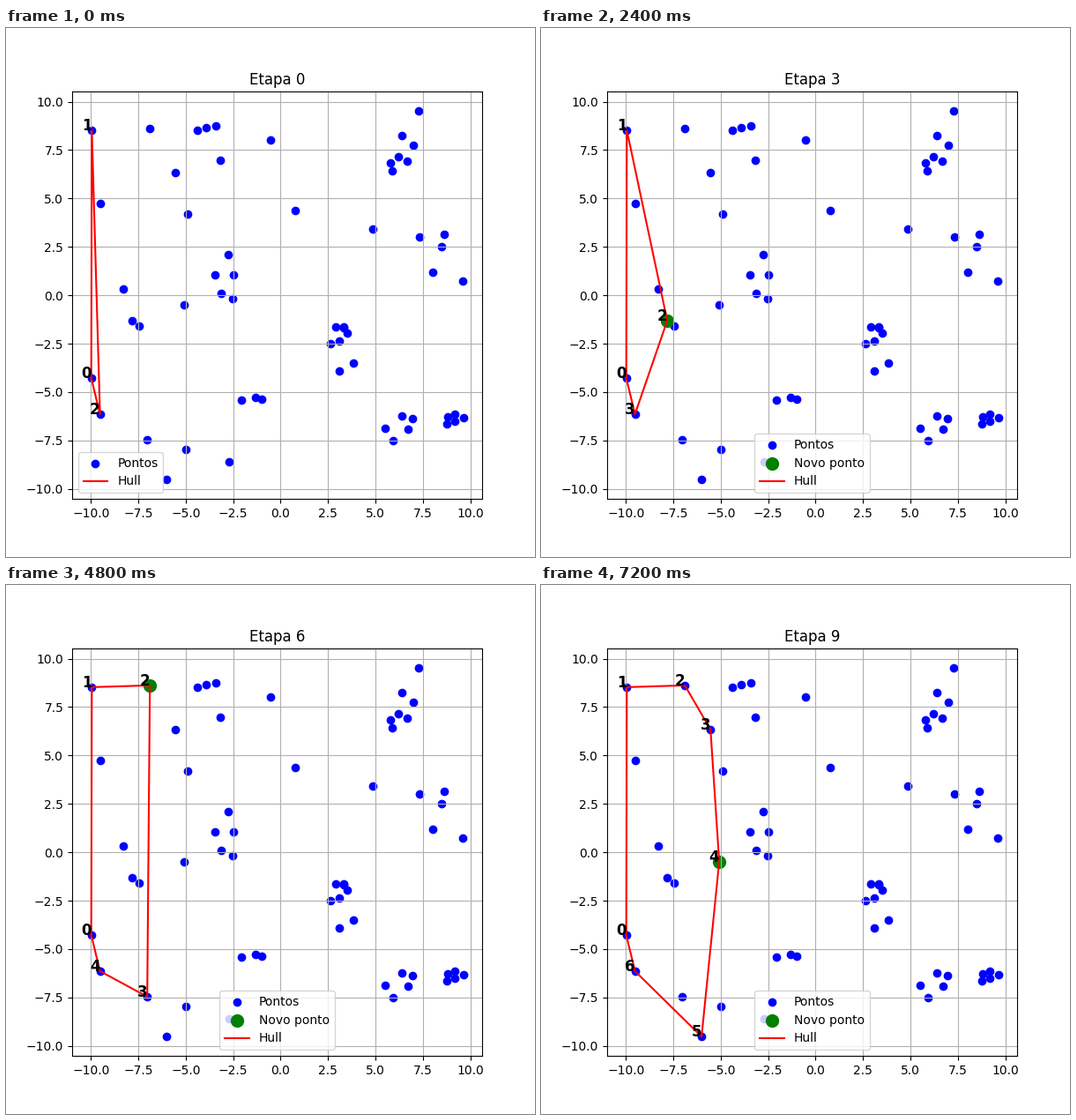
Recreate the animation shown at these times as a matplotlib script. Size 600x600 px, loop 8 s.

```python
import matplotlib.pyplot as plt
import numpy as np
from matplotlib.animation import FuncAnimation

STEPS = 10
STEP_MS = 800

# The points the hull takes in, from left to right.
HULL_INPUT = [
    (-9.98, -4.27), (-9.95, 8.53), (-9.52, -6.14), (-9.48, 4.75),
    (-8.28, 0.33), (-7.82, -1.31), (-7.45, -1.59), (-7.03, -7.46),
    (-6.89, 8.62), (-6.01, -9.52), (-5.54, 6.34), (-5.08, -0.49),
]
# Isolated points that bound the rest of the cloud.
OUTLIERS = [
    (-4.98, -7.96), (-4.89, 4.20), (-2.71, -8.60), (-0.52, 8.03),
    (0.78, 4.38), (4.86, 3.43), (7.28, 9.53), (9.61, 0.74),
]
# Centre and size of each loose group.
GROUPS = [
    (-3.6, 7.7, 4), (6.2, 7.0, 6), (-2.7, 1.0, 5), (-1.3, -4.6, 3),
    (3.3, -2.6, 8), (6.2, -6.6, 5), (8.9, -5.6, 5), (7.9, 2.1, 4),
]


def scatter_groups(seed=7):
    rng = np.random.default_rng(seed)
    return [(x + rng.uniform(-0.8, 0.8), y + rng.uniform(-1.3, 1.3))
            for x, y, size in GROUPS for _ in range(size)]


def cross(o, a, b):
    return (a[0] - o[0]) * (b[1] - o[1]) - (a[1] - o[1]) * (b[0] - o[0])


def chain(points):
    """Keep only the clockwise turns along the points."""
    kept = []
    for p in points:
        while len(kept) > 1 and cross(kept[-2], kept[-1], p) >= 0:
            kept.pop()
        kept.append(p)
    return kept


def convex_hull(points):
    """Clockwise hull, starting at the leftmost point."""
    return chain(points)[:-1] + chain(points[::-1])[:-1]


cloud = HULL_INPUT + OUTLIERS + scatter_groups()
fig, ax = plt.subplots(figsize=(6, 6), dpi=100)


def draw(step):
    ax.clear()
    seen = HULL_INPUT[:step + 3]
    hull = convex_hull(seen)

    ax.scatter(*zip(*cloud), color="blue", label="Pontos")
    if step:
        ax.scatter(*seen[-1], color="green", s=100, label="Novo ponto")
    ax.plot(*zip(*hull, hull[0]), color="red", label="Hull")
    for i, (x, y) in enumerate(hull):
        ax.text(x, y, str(i), fontsize=12, fontweight="bold", ha="right")

    ax.set_xlim(-10.988, 10.619)
    ax.set_ylim(-10.513, 10.527)
    ax.set_title(f"Etapa {step}")
    ax.grid(True)
    ax.legend(loc="lower center" if step else "lower left")
    return []


anim = FuncAnimation(fig, draw, frames=STEPS, init_func=lambda: draw(0),
                     interval=STEP_MS, repeat=True, repeat_delay=0)
plt.show()
```
